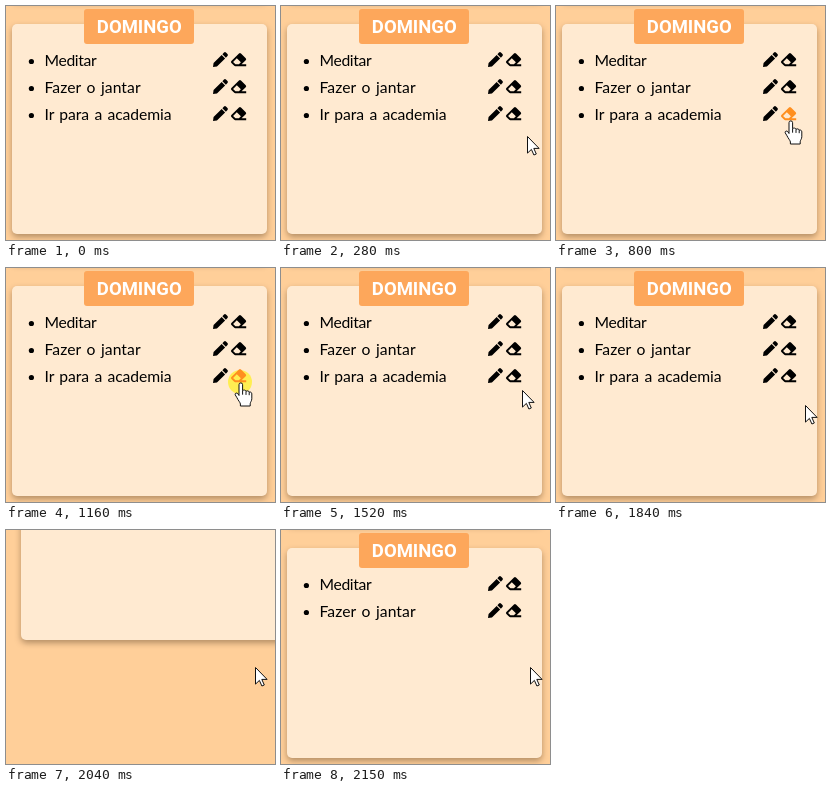
Write an HTML page that moves like this. It is 269x234 px and loops after 3450 ms.

```html
<!DOCTYPE html>
<html lang="pt">
<head>
<meta charset="utf-8">
<title>Domingo</title>
<style>
html, body { margin: 0; width: 100%; height: 100%; overflow: hidden; background: #ffcf99; }
svg { display: block; width: 100%; height: 100%; }
.card { fill: #ffead1; filter: url(#shade); }
.title { font: 700 18.5px Roboto, sans-serif; fill: #fff; text-anchor: middle; }
.item { font: 15.7px Lato, sans-serif; word-spacing: 1.4px; }
.cursor path { fill: #fff; stroke: #111; stroke-linejoin: round; }
</style>
</head>
<body>
<svg viewBox="0 0 269 234">
  <defs>
    <filter id="shade" x="-20%" y="-20%" width="140%" height="140%" color-interpolation-filters="sRGB">
      <feDropShadow dx="0" dy="3" stdDeviation="3" flood-color="#201000" flood-opacity=".34"/>
    </filter>
    <path id="pencil" d="M0 16l.6-4.2 8.6-8.7 3.7 3.7-8.7 8.6zM10 2.3l1.7-1.7a1.5 1.5 0 0 1 2.1 0l1.6 1.6a1.5 1.5 0 0 1 0 2.1L13.7 6z"/>
    <path id="eraser" fill-rule="evenodd" d="M15.5 8.6a1.5 1.5 0 0 0 0-2.1l-5-5a1.5 1.5 0 0 0-2.1 0l-8 8a1.5 1.5 0 0 0 0 2.1l3 3a1.5 1.5 0 0 0 1.1.4H16v-2h-4.9zM6.1 6.6l4.3 4.3-2.1 2.1H4.7l-2.5-2.5z"/>
  </defs>
  <rect width="269" height="234" fill="#ffcf99"/>
  <g id="list">
    <rect class="card" x="6" y="-120" width="255" height="114" rx="5"/>
    <rect class="card" x="6" y="18" width="255" height="210" rx="5"/>
    <rect x="78" y="3" width="110" height="35" rx="3" fill="#fda75b"/>
    <text class="title" x="133.3" y="27">DOMINGO</text>
    <circle id="flash" cx="234" cy="114" r="12" fill="#ffee3c"/>
    <g id="rows"></g>
  </g>
  <rect id="reload" class="card" x="15" y="-120" width="290" height="230" rx="5"/>
  <g id="cursor" class="cursor">
    <path id="arrow" d="M.5.5v16.6l3.9-3.7 2.5 5.6 2.4-1-2.5-5.6h5.3z"/>
    <path id="hand" d="M-2 12.5V1.7a1.8 1.8 0 0 1 3.6 0v6c.8-1 3.2-.8 3.4.6.9-.8 3-.5 3.2.9 1-.5 2.6 0 2.6 1.6v5c0 2-1.6 3.6-1.6 5v2.2h-9.8v-2c0-1.4-2.4-3.8-3.4-6.2l-1.8-3c-.6-1.6 1.6-2.4 2.6-1.2zM1.6 7.7v4M5 8.3v3.6M8.2 9.2v3"/>
  </g>
</svg>
<script>
const LOOP = 3450, RELOAD = 2010, LOADED = 2080;
const $ = id => document.getElementById(id);
const show = (el, on) => el.setAttribute('visibility', on ? 'visible' : 'hidden');

const items = [['Meditar', -.35], ['Fazer o jantar', .07], ['Ir para a academia', -.07]];
$('rows').innerHTML = items.map(([label, gap], i) => `
  <g transform="translate(0 ${i * 27})">
    <circle cx="25.4" cy="55.5" r="2.6"/>
    <text class="item" x="38.5" y="60" letter-spacing="${gap}">${label}</text>
    <use href="#pencil" transform="translate(207 46) scale(.94)"/>
    <use class="rub" href="#eraser" transform="translate(225 46) scale(.95)"/>
  </g>`).join('');
const last = $('rows').lastElementChild;
const rub = last.querySelector('.rub');

// time, x, y of the pointer tip
const path = [
  [30, 268, 150], [540, 238, 123], [570, 238, 123], [800, 235, 115],
  [1430, 235, 115], [1520, 241, 122], [1840, 249, 137], [LOOP, 249, 137]
];
const ease = p => 1 - (1 - p) ** 2;

function tip(t) {
  const i = Math.max(1, path.findIndex(k => k[0] >= t));
  const [t0, x0, y0] = path[i - 1], [t1, x1, y1] = path[i];
  const p = ease(Math.max(0, (t - t0) / (t1 - t0)));
  return [x0 + (x1 - x0) * p, y0 + (y1 - y0) * p];
}

function draw(t) {
  const [x, y] = tip(t);
  const hover = y < 118;
  const loading = t >= RELOAD && t < LOADED;
  $('cursor').setAttribute('transform', `translate(${Math.round(x)} ${Math.round(y)})`);
  show($('cursor'), t >= 30);
  $('arrow').style.display = hover ? 'none' : '';
  $('hand').style.display = hover ? '' : 'none';
  rub.setAttribute('fill', hover ? '#ff8f1f' : '#000');
  show($('flash'), t >= 1160 && t < 1270);
  $('flash').setAttribute('opacity', t < 1240 ? .85 : .4);
  $('list').style.display = loading ? 'none' : '';
  $('reload').style.display = loading ? '' : 'none';
  show(last, t < RELOAD);
}

const start = performance.now();
function tick() {
  draw((performance.now() - start) % LOOP);
  requestAnimationFrame(tick);
}
draw(0);
requestAnimationFrame(tick);
</script>
</body>
</html>
```
